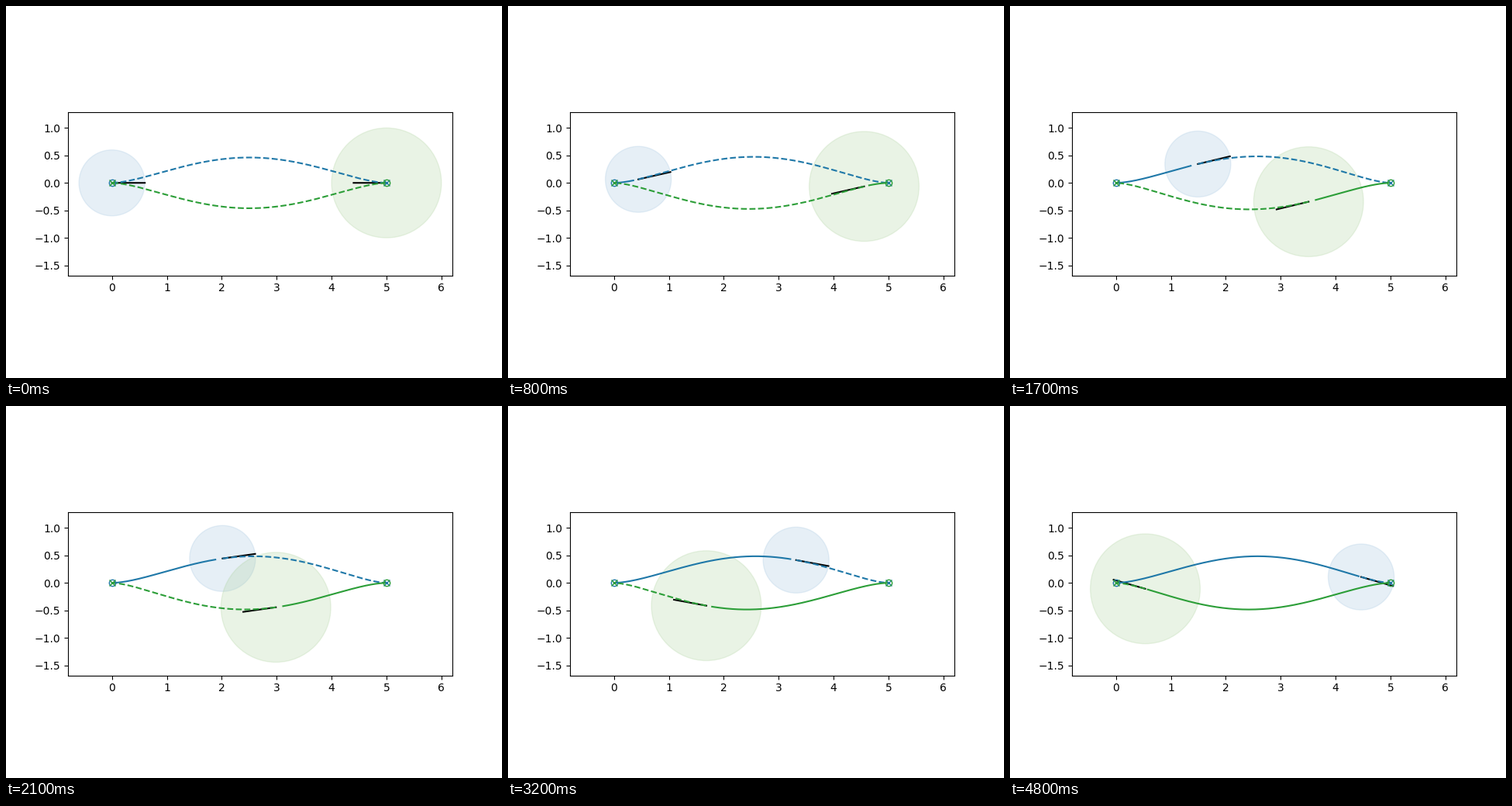
These frames come from a looping animation (640 by 480 pixels, 4.9 s). A matplotlib script:

```python
import numpy as np
import matplotlib.pyplot as plt
from matplotlib.animation import FuncAnimation

FRAMES = 49
GOAL = 5.0
HEADING = 0.6  # length of the black heading line
POWER = 1.68   # how softly the path leaves and reaches the ends


def progress(n):
    """Distance along x: a quick start that eases out towards the goal."""
    return GOAL * (1 - np.exp(-(n / 30.5) ** 1.775))


def path(x, settled=1.0):
    """Arc from 0 to GOAL; a fresh plan is a little lower and symmetric."""
    height = 0.462 + 0.023 * settled
    top = 0.5 + 0.016 * settled
    s = np.asarray(x) / GOAL
    rise = (s / top) ** (2 * POWER * top)
    fall = ((1 - s) / (1 - top)) ** (2 * POWER * (1 - top))
    return height * rise * fall


class Vehicle:
    def __init__(self, ax, radius, color, fill, mirrored):
        self.mirrored = mirrored
        self.body = plt.Circle((0, 0), radius, color=fill, alpha=0.25)
        ax.add_patch(self.body)
        self.nose, = ax.plot([], [], color="black", zorder=2)
        self.past, = ax.plot([], [], color=color, zorder=3)
        self.future, = ax.plot([], [], "--", color=color, zorder=3)
        for x, marker in ((0, "o"), (GOAL, "x")):
            ax.plot(*self.place(x, 0), marker, color=color,
                    fillstyle="none", zorder=4)

    def place(self, x, y):
        return (GOAL - x, -y) if self.mirrored else (x, y)

    def move(self, n):
        x = progress(n)
        y = path(x)
        self.body.center = self.place(x, y)

        eps = 1e-5
        angle = np.arctan((path(x + eps) - y) / eps)
        reach = np.array([0, HEADING])
        self.nose.set_data(*self.place(x + reach * np.cos(angle),
                                       y + reach * np.sin(angle)))

        # The trail ends one step behind the vehicle
        xs = np.linspace(0, progress(max(n - 1, 0)), 150)
        self.past.set_data(*self.place(xs, path(xs)))
        xs = np.linspace(x, GOAL, 150)
        settled = 1 - max(0, 1 - n / 25) ** 2
        self.future.set_data(*self.place(xs, path(xs, settled)))


fig, ax = plt.subplots(figsize=(6.4, 4.8), dpi=100)
ax.set_aspect("equal")
ax.set_xlim(-0.8, 6.2)
ax.set_ylim(-1.685, 1.285)

vehicles = [
    Vehicle(ax, 0.6, "#1f78a8", "#9fc3df", mirrored=False),
    Vehicle(ax, 1.0, "#2c9e38", "#abd19b", mirrored=True),
]


def update(n):
    for v in vehicles:
        v.move(n)


anim = FuncAnimation(fig, update, frames=FRAMES, interval=100, repeat=True)
plt.show()
```
